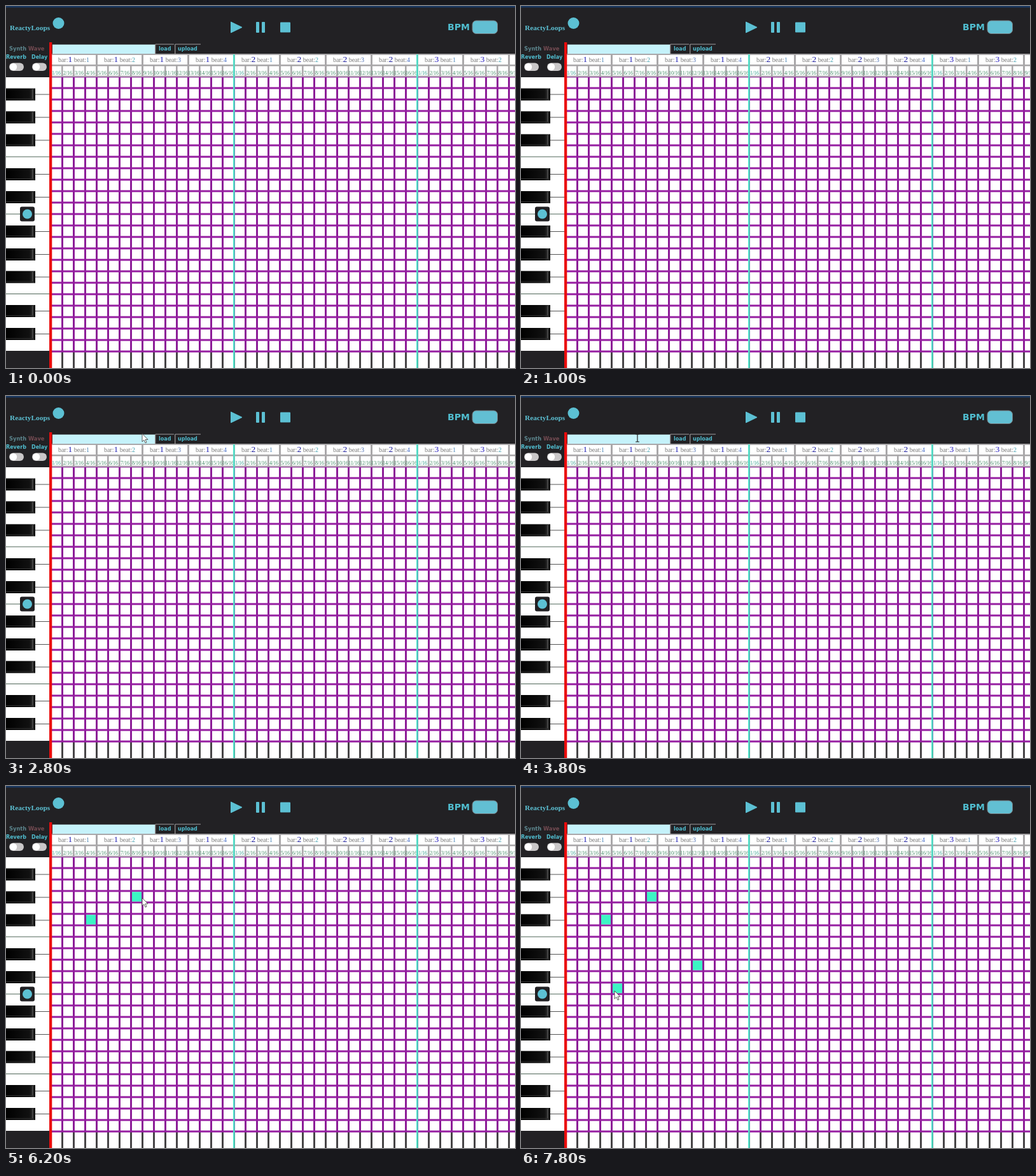
Write an HTML page that moves like this. It is 800 by 569 pixels and loops after 8 s.

```html
<!DOCTYPE html>
<html lang="en">
<head>
<meta charset="utf-8">
<title>Loop sequencer</title>
<style>
  html, body { margin: 0; width: 100%; height: 100%; overflow: hidden; background: #fff; }
  svg { display: block; width: 100vw; height: 100vh; }
  .ui { font: bold 8px "DejaVu Sans", sans-serif; fill: #50bdcf; }
  .ruler { font-family: "Liberation Serif", serif; text-anchor: middle; }
</style>
</head>
<body>
<svg id="stage" viewBox="0 0 800 569" preserveAspectRatio="none"></svg>
<script>
const LOOP = 8000, TICK = 200;
const CELL = 18, LEFT = 70, TOP = 111, ROWS = 24, BOTTOM = TOP + ROWS * CELL;
const DARK = '#222124', CYAN = '#5cc0d3', GRAY = '#aaa8aa';
const stage = document.getElementById('stage');

const rect = (x, y, w, h, fill, more = '') =>
  `<rect x="${x}" y="${y}" width="${w}" height="${h}" fill="${fill}" ${more}/>`;
const text = (x, y, s, more = 'class="ui"') => `<text x="${x}" y="${y}" ${more}>${s}</text>`;
const circle = (x, y, r, fill) => `<circle cx="${x}" cy="${y}" r="${r}" fill="${fill}"/>`;

function header() {
  return rect(0, 0, 800, 76, DARK) + rect(0, 0, 800, 2.5, '#19375f')
    + text(6, 38, 'ReactyLoops', 'font-family="Liberation Serif, serif" font-weight="bold" font-size="11.4" fill="#5cc0d3"')
    + circle(82.5, 27, 9, CYAN)
    + `<path d="M353.5 25L371 33.5 353.5 42Z" fill="${CYAN}" stroke="${CYAN}" stroke-linejoin="round"/>`
    + rect(393, 25, 5, 17, CYAN, 'rx="1"') + rect(402, 25, 5, 17, CYAN, 'rx="1"')
    + rect(431, 25.5, 16, 16, CYAN, 'rx="1"')
    + text(694, 38, 'BPM', 'class="ui" style="font-size:14px"')
    + rect(733, 23, 39.5, 20.5, '#62bfd3', 'rx="6" stroke="#777d82"')
    + rect(73, 60, 161, 15.5, '#c5f2fa') + rect(73, 60, 161, 1, '#68777b')
    + [[235, 29, 'load', 240], [266, 40, 'upload', 270]].map(([x, w, s, tx]) =>
        rect(x, 59.5, w, 1.2, '#8a8889') + rect(x - 1, 60, 1.4, 15, '#8a8889') + text(tx, 70, s)).join('');
}

function ruler() {
  let s = rect(72, 76, 728, 36, '#fff') + rect(72, 75, 728, 2, GRAY)
    + rect(72, 92, 728, 2.6, GRAY) + rect(72, 109.6, 728, 2, GRAY);
  const barInk = ['#2020b4', '#1c1c9e', '#2a20c0'];
  const beatInk = ['#4a86b8', '#42a0b0', '#4468b0', '#4a70c8'];
  for (let i = 0; i < 41; i++) {
    const x = LEFT + i * CELL, step = i % 16 + 1;
    s += rect(x + CELL - 1, 94, 2.6, 17, GRAY);
    s += text(x + 9, 107.5, `${step}/16`, `class="ruler" font-size="8" fill="${step === 1 ? '#259a86' : '#38865f'}"`);
    if (i % 4) continue;
    const bar = i >> 4, beat = (i >> 2) % 4;
    s += rect(x + 71, 76, 3, 35, GRAY);
    s += text(x + 36.5, 88, `<tspan fill="#777">bar:</tspan><tspan font-size="13.5" fill="${barInk[bar]}">${bar + 1}</tspan>`
      + `<tspan fill="#777"> beat:</tspan><tspan fill="${beatInk[beat]}">${beat + 1}</tspan>`, 'class="ruler" font-size="10"');
  }
  return s;
}

function grid() {
  let s = rect(72, 112, 728, 457, '#fff');
  for (let i = 1; i <= 40; i++) {
    const x = LEFT + i * CELL - 1;
    s += rect(x, 112, 3, BOTTOM - 112, '#8c1c97') + rect(x, BOTTOM + 1, 3, 25, '#474547');
  }
  s += rect(72, 111.5, 728, 1, '#8c1c97');
  for (let r = 1; r <= ROWS; r++) s += rect(72, TOP + r * CELL - 1.5, 728, 3, '#961ea1');
  return s;
}

function toggle(x) {
  return rect(x, 89.5, 23, 12.5, '#c9c7c8', 'rx="6.2"') + circle(x + 6.6, 95.7, 5.6, '#fff');
}

function piano() {
  let s = rect(0, 57, 68, 55, DARK) + rect(0, 112, 68, 431, '#fff') + rect(0, 542, 68, 27, DARK);
  for (const y of [237, 327, 452.5]) s += rect(0, y - 0.5, 68, 1, '#4e6658');
  for (const y of [139, 175, 211, 264.5, 300.5, 354.5, 390.5, 426, 479.5, 515.5]) {
    s += rect(46, y - 0.5, 22, 1, '#555') + rect(0, y - 9.5, 46, 19, 'url(#key)')
      + rect(0, y + 6.5, 41, 1, '#303030') + rect(41, y - 8, 1, 15, '#555');
  }
  return s + rect(22, 315.5, 23, 23, DARK, 'rx="3"') + circle(33.5, 327, 7.5, CYAN)
    + text(5, 70, 'Synth', 'class="ui" style="fill:#5c858d;font-size:8.3px"')
    + text(35, 70, 'Wave', 'class="ui" style="fill:#744b52;font-size:8.3px"')
    + text(0, 83, 'Reverb') + text(40, 83, 'Delay') + toggle(5) + toggle(41)
    + rect(68, 57, 4.3, 512, '#ea0c0c');
}

// column, row, time of the click
const notes = [[3, 5, 5000], [7, 3, 5800], [11, 9, 7000], [4, 11, 7600]];
// time, x, y of the pointer
const track = [
  [1800, 292, 48], [2000, 280, 41], [2400, 270, 46], [3000, 186, 66], [3800, 183, 66],
  [4200, 160, 130], [4600, 133, 208], [5200, 133, 208], [5800, 206, 172], [6200, 214, 176],
  [6800, 276, 280], [7000, 276, 280], [7600, 147, 320], [7800, 147, 322]
];

stage.innerHTML = `<defs><linearGradient id="key">
  <stop offset="0" stop-color="#000"/><stop offset=".8" stop-color="#111"/>
  <stop offset=".93" stop-color="#2c2c2c"/><stop offset="1" stop-color="#050505"/></linearGradient></defs>`
  + header() + ruler() + grid()
  + notes.map(([c, r]) => rect(LEFT + c * CELL + 2, TOP + r * CELL + 1.5, 15, 15, '#3cf5c4', 'class="note"')).join('')
  + [16, 32].map(i => rect(LEFT + i * CELL - 1, 76, 2.6, 493, '#4fe0c8')).join('')
  + piano()
  + `<path id="arrow" d="M0 0V12.5L2.9 9.8 5 14.4 7 13.5 5 9.1H9Z" fill="#fff" stroke="#333" stroke-width=".8"/>
     <path id="beam" d="M-3-6H-1Q0-6 0-5Q0-6 1-6H3M0-5V5M-3 6H-1Q0 6 0 5Q0 6 1 6H3" fill="none" stroke="#222" stroke-width="1.2"/>`;

const noteEls = stage.querySelectorAll('.note');
const arrow = stage.querySelector('#arrow'), beam = stage.querySelector('#beam');
const show = (el, on) => el.setAttribute('visibility', on ? 'visible' : 'hidden');

function pointerAt(t) {
  if (t < track[0][0]) return null;
  const i = track.findIndex(p => p[0] > t);
  if (i < 0) return track[track.length - 1].slice(1);
  const [t0, x0, y0] = track[i - 1], [t1, x1, y1] = track[i];
  const k = (t - t0) / (t1 - t0);
  return [x0 + (x1 - x0) * k, y0 + (y1 - y0) * k];
}

function draw(ms) {
  const t = Math.floor(ms % LOOP / TICK) * TICK;
  noteEls.forEach((el, i) => show(el, t >= notes[i][2]));
  const p = pointerAt(t);
  const typing = p && p[0] > 73 && p[0] < 234 && p[1] > 60 && p[1] < 76;
  show(arrow, p && !typing);
  show(beam, typing);
  if (p) (typing ? beam : arrow).setAttribute('transform', `translate(${p[0]} ${p[1]})`);
}

const start = performance.now();
function frame() {
  draw(performance.now() - start);
  requestAnimationFrame(frame);
}
frame();
</script>
</body>
</html>
```
